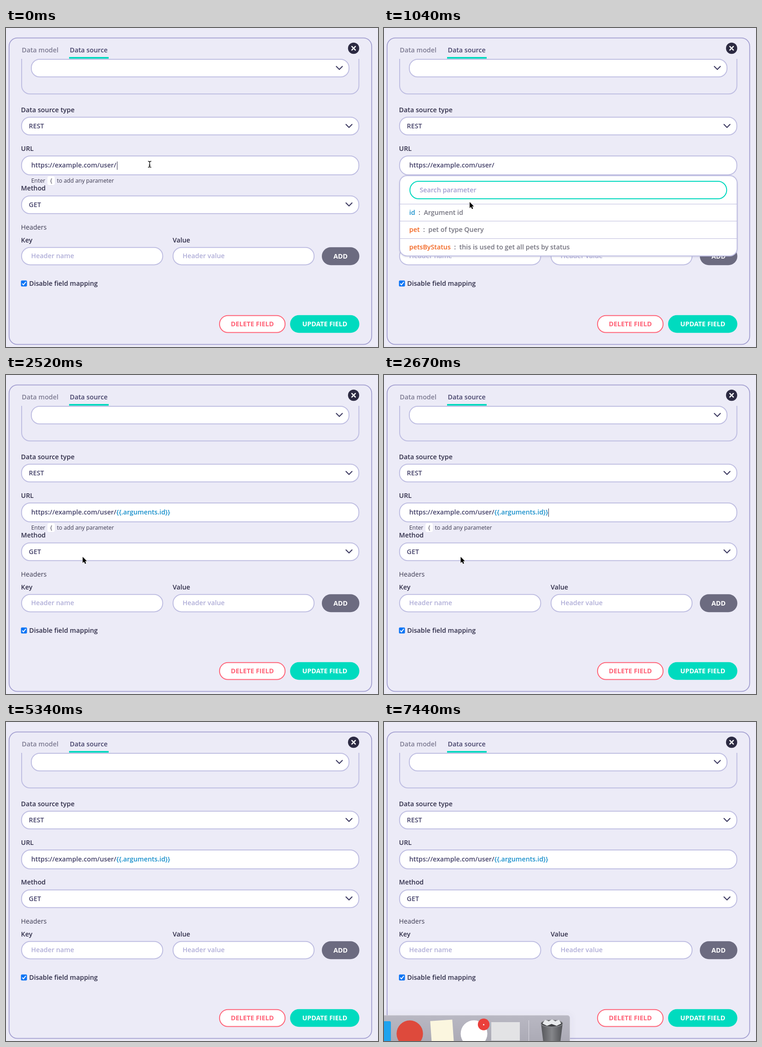
Recreate the animation shown at these times as an HTML page. Size 808 by 693 pixels, loop 7540 ms.

```html
<!DOCTYPE html>
<html lang="en">
<head>
<meta charset="utf-8">
<title>Data source form</title>
<style>
html, body { margin: 0; width: 100%; height: 100%; overflow: hidden; background: #ecebf7; }
svg { display: block; width: 100vw; height: 100vh; }
text { font: 600 14.28px "Open Sans", "Noto Sans", sans-serif; fill: #45426a; white-space: pre; }
.label { fill: #2f2d48; }
.plain { font-weight: 400; fill: #3b3950; }
.small { font-size: 12.25px; }
.hint { fill: #b0aed8; }
.tab { fill: #7d7b92; }
.btn { font-weight: 700; text-anchor: middle; fill: #fff; }
.danger { fill: #ff6579; }
.box { fill: #fff; stroke: #bfbee2; stroke-width: 2; }
.chev { fill: none; stroke: #3f3c63; stroke-width: 2.2; stroke-linecap: round; stroke-linejoin: round; }
.info { fill: #74737f; }
.id { fill: #178fcb; }
.query { fill: #f2641f; }
.caret { stroke: #33304e; stroke-width: 1; }
</style>
</head>
<body>
<svg viewBox="0 0 808 693">
  <defs>
    <path id="chevron" class="chev" d="M-6.5 -3.3L0 3.3L6.5 -3.3"/>
    <path id="arrow" d="M0 0V13.2L3 10.4L5.1 15.3L7.4 14.3L5.3 9.5H9.3Z" fill="#000" stroke="#fff" stroke-width="1.2" paint-order="stroke"/>
    <path id="hand" transform="translate(-4.7 -1)" d="M3.5 9.5V1.8q1.2-1.6 2.4 0V6q1.2-.8 2.3.3 1.3-.6 2.2.6 1.6-.3 1.9 1.2V11q0 2-1 3V16H5V14.5L.8 10Q.3 8.2 2 8.3Z" fill="#fff" stroke="#000" stroke-width="1.1" stroke-linejoin="round"/>
    <path id="beamLine" fill="none" d="M-3.5 -6.5Q0 -6.5 0 -4.5Q0 -6.5 3.5 -6.5M0 -5V5M-3.5 6.5Q0 6.5 0 4.5Q0 6.5 3.5 6.5M-1.8 2.2H1.8"/>
    <g id="beam">
      <use href="#beamLine" stroke="#fff" stroke-width="2.6"/>
      <use href="#beamLine" stroke="#000" stroke-width="1.3"/>
    </g>
    <clipPath id="body"><rect y="67" width="808" height="626"/></clipPath>
    <filter id="soft" x="-10%" y="-30%" width="120%" height="160%">
      <feDropShadow dx="0" dy="1.5" stdDeviation="1.5" flood-color="#55527f" flood-opacity=".18"/>
    </filter>
    <filter id="glow" x="-10%" y="-40%" width="120%" height="180%">
      <feDropShadow dx="0" dy="0" stdDeviation="8" flood-color="#555566" flood-opacity=".08"/>
    </filter>
    <linearGradient id="shelf" x2="0" y2="1">
      <stop offset="0" stop-color="#b9b8c3"/><stop offset="1" stop-color="#a3a2ad"/>
    </linearGradient>
    <linearGradient id="bin">
      <stop offset="0" stop-color="#55565a"/><stop offset=".5" stop-color="#85868a"/><stop offset="1" stop-color="#505155"/>
    </linearGradient>
  </defs>

  <rect width="808" height="693" fill="#ecebf7"/>
  <rect x="6.7" y="21.7" width="787.6" height="665.6" rx="18" fill="none" stroke="#a29ed0" stroke-width="1.8"/>

  <g clip-path="url(#body)">
    <rect class="box" x="34" y="30" width="732.5" height="113.2" rx="18" style="fill:none"/>
    <rect class="box" x="55" y="68" width="690" height="38.3" rx="18"/>
  </g>
  <use href="#chevron" x="724" y="86.8"/>
  <text class="tab" x="34.2" y="53.3">Data model</text>
  <text x="138.5" y="53.3">Data source</text>
  <rect x="137" y="63" width="86" height="3.6" fill="#00d8be"/>
  <circle cx="755" cy="44" r="12.2" fill="#2c2a42"/>
  <path d="M751.2 40.2L758.8 47.8M758.8 40.2L751.2 47.8" stroke="#fff" stroke-width="2.5" stroke-linecap="round"/>

  <text class="label" x="32.6" y="183">Data source type</text>
  <rect class="box" x="33.8" y="193.8" width="732.6" height="38.5" rx="18"/>
  <text x="49.6" y="218.2">REST</text>
  <use href="#chevron" x="745" y="212.8"/>

  <text class="label" x="32.6" y="267">URL</text>
  <rect class="box" x="33.8" y="278" width="732.6" height="41" rx="19"/>
  <text x="54.8" y="303.3">https://example.com/user/<tspan id="param" class="id">{{.arguments.id}}</tspan></text>
  <path id="caret" class="caret" d="M0 290V308"/>
  <g id="help">
    <text class="plain small" x="54.8" y="336">Enter</text>
    <rect x="90" y="322" width="16" height="19" rx="4" fill="#fff"/>
    <text class="plain small" x="98" y="336" text-anchor="middle">{</text>
    <text class="plain small" x="110.5" y="336">to add any parameter</text>
  </g>

  <text class="label" x="32.6" y="353.2">Method</text>
  <rect class="box" x="33.8" y="364.8" width="732.6" height="38.5" rx="18"/>
  <text x="49.6" y="389.2">GET</text>
  <use href="#chevron" x="745" y="383.3"/>

  <text class="plain" x="32.6" y="437.5">Headers</text>
  <text class="label" x="32.6" y="466.2">Key</text>
  <text class="label" x="361.9" y="466.2">Value</text>
  <rect class="box" x="33.8" y="476.8" width="306.6" height="37.7" rx="18.5"/>
  <rect class="box" x="362.8" y="476.8" width="306.4" height="37.7" rx="18.5"/>
  <text class="hint" x="54.6" y="500.2">Header name</text>
  <text class="hint" x="383.6" y="500.2">Header value</text>
  <rect x="686" y="476.3" width="81.5" height="39" rx="19.5" fill="#6c6b80"/>
  <text class="btn" x="726.7" y="500.5">ADD</text>

  <rect x="32.5" y="548.5" width="13" height="13" rx="2" fill="#0b74f5"/>
  <path d="M35.3 555.3L38 558L43 551.5" fill="none" stroke="#fff" stroke-width="2"/>
  <text class="label" x="50.2" y="559.7">Disable field mapping</text>

  <rect x="463.8" y="624.8" width="142.4" height="36.7" rx="18.2" fill="#fff" stroke="#ff6579" stroke-width="2"/>
  <text class="btn danger" x="535" y="647.7">DELETE FIELD</text>
  <rect x="617" y="623.8" width="150.5" height="38.5" rx="19.2" fill="#00dbbf"/>
  <text class="btn" x="692.4" y="647.7">UPDATE FIELD</text>

  <g id="popup">
    <rect class="box" x="34" y="320.7" width="733" height="174.5" rx="16" filter="url(#soft)"/>
    <rect id="search" class="box" x="56.3" y="333" width="688" height="38" rx="19"/>
    <text x="77.4" y="357" style="fill:#a09cd0">Search parameter</text>
    <path id="searchCaret" class="caret" d="M78.5 343V361"/>
    <rect id="row" x="35.5" y="382" width="729.5" height="38" fill="#cdcce8"/>
    <path d="M35 382.5H766M35 419.5H766M35 457.5H766" stroke="#bcbbdc"/>
    <text class="info" x="54.8" y="406"><tspan class="id">id</tspan>  :  Argument id</text>
    <text class="info" x="54.8" y="443.2"><tspan class="query">pet</tspan>  :  pet of type Query</text>
    <text class="info" x="54.8" y="481"><tspan class="query">petsByStatus</tspan>  :  this is used to get all pets by status</text>
  </g>

  <g id="dock">
    <rect x="-30" y="637.5" width="433.5" height="90" rx="5" fill="url(#shelf)" stroke="#c9c8d2" filter="url(#glow)"/>
    <rect x="-40" y="650" width="55" height="55" rx="3" fill="#1fa3ee"/>
    <circle cx="56" cy="677" r="28.7" fill="#de4a3c"/>
    <rect x="102" y="648" width="48" height="60" fill="#fbf6df" transform="rotate(-4 126 672)"/>
    <circle cx="195.5" cy="677" r="29" fill="#fff"/>
    <circle cx="216.5" cy="657" r="12.7" fill="#ea3f3b"/>
    <circle cx="216.5" cy="657.5" r="1.5" fill="#fff"/>
    <rect x="233" y="652" width="62" height="40" fill="#e3e3e5"/>
    <path d="M314.5 648V720" stroke="#dddce4"/>
    <path d="M341 655H388L381 712H348Z" fill="url(#bin)"/>
    <ellipse cx="364.5" cy="655" rx="23.5" ry="7.5" fill="#3f4044" stroke="#8b8c90" stroke-width="1.5"/>
    <path d="M344 655L350 647L358 650L365 646L372 650L380 647L385 655L375 660L364 656L354 660Z" fill="#e8eaec"/>
  </g>

  <use id="cursor"/>
</svg>
<script>
const LOOP = 7540, STEP = 148.5;
const $ = id => document.getElementById(id);
const show = (id, on) => $(id).style.display = on ? "" : "none";
const within = (n, a, b) => n >= a && n < b;

// pointer stops: step, shape, x, y
const stops = [
  [0, "beam", 312, 296], [6, "beam", 262, 344], [7, "arrow", 186, 378], [8, "hand", 140, 404],
  [9, "hand", 127, 408.5], [10, "hand", 131, 408], [11, "hand", 145, 404], [12, "hand", 160, 399],
  [13, "hand", 168, 397], [14, "hand", 167, 396], [17, "arrow", 166.5, 395],
  [20, "arrow", 148, 392], [21, "arrow", 70, 384], [22, "arrow", 17, 378], [24, "arrow", 90, 381],
  [25, "arrow", 260, 387], [26, "arrow", 460, 391], [27, "arrow", 631, 393], [28, "arrow", 621.5, 675],
  [31, "arrow", 655, 560], [32, "arrow", 690, 400], [33, "arrow", 735, 230], [34, "arrow", 775, 90],
  [35, "arrow", 799, 4], [36], [45, "arrow", 779, 672], [46, "arrow", 700, 684], [47]
];

const mix = (a, b, k) => `rgb(${a.map((v, i) => Math.round(v + (b[i] - v) * k))})`;

function draw(t) {
  const n = Math.floor((t + 12) / STEP);
  const [, shape, x, y] = stops.findLast(s => s[0] <= n);
  show("cursor", shape);
  if (shape) {
    $("cursor").setAttribute("href", "#" + shape);
    $("cursor").setAttribute("transform", `translate(${x} ${y})`);
  }

  show("popup", within(n, 2, 16));
  show("row", within(n, 8, 16));
  show("searchCaret", n < 6 || within(n, 9, 13));
  const focus = n < 3 ? 0 : n < 4 ? .7 : 1;
  $("search").style.stroke = mix([162, 194, 222], [0, 216, 190], focus);

  const filled = n >= 16;
  show("param", filled);
  show("caret", n < 2 || within(n, 18, 21) || within(n, 24, 28));
  $("caret").setAttribute("transform", `translate(${filled ? 357.5 : 241.5} 0)`);
  show("help", n < 30);

  const rise = Math.max(0, Math.min(1, (n - 46) / 4));
  show("dock", rise > 0);
  $("dock").setAttribute("transform", `translate(0 ${56 * (1 - rise) ** 1.3})`);
}

const start = performance.now();
function tick() {
  draw((performance.now() - start) % LOOP);
  requestAnimationFrame(tick);
}
tick();
</script>
</body>
</html>
```
